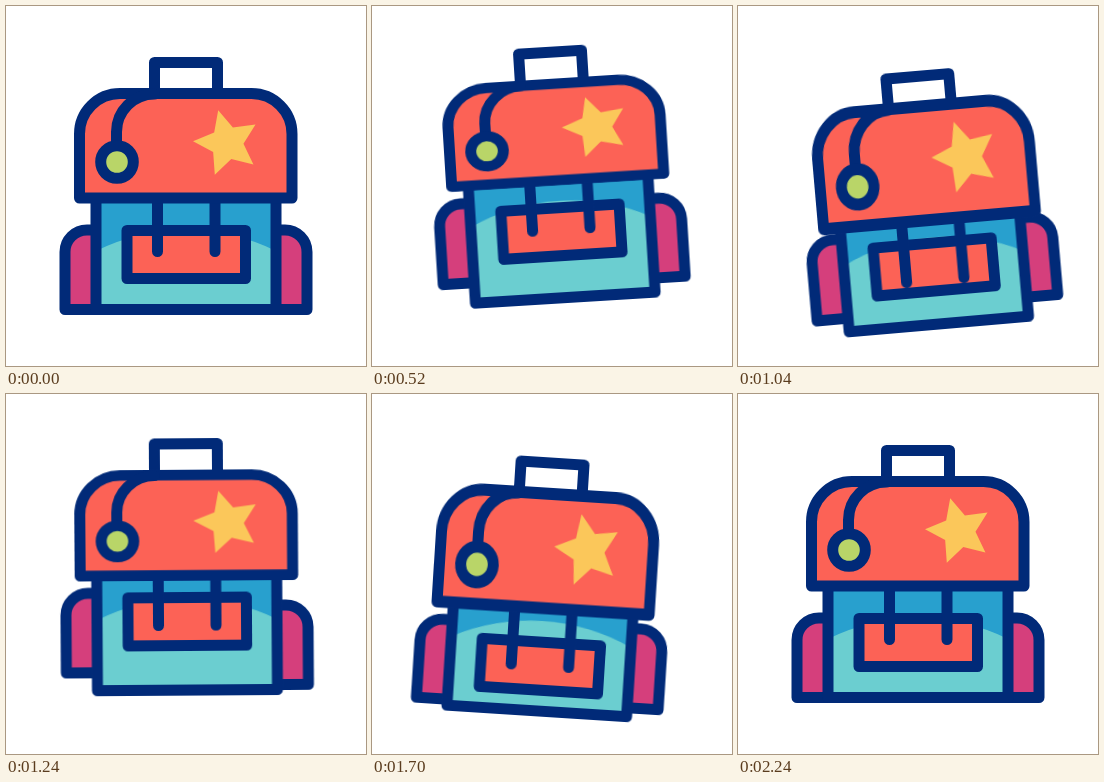
An HTML page for the animation above (2400 ms loop, 360 by 360 pixels).

```html
<!DOCTYPE html>
<html lang="en">
<head>
<meta charset="utf-8">
<title>Bouncing backpack</title>
<style>
  html, body { margin: 0; width: 100%; height: 100%; overflow: hidden; background: #fff; }
  svg { display: block; width: 100vw; height: 100vh; }

  .line { fill: none; stroke: #012a78; stroke-width: 11; stroke-linecap: round; stroke-linejoin: round; }
  .red { fill: #fc6256; }
  .pink { fill: #d53f7c; }
  .teal { fill: #6bced0; }
  .blue { fill: #28a0ce; }
  .gold { fill: #fbc75a; }
  .green { fill: #b9d568; }

  .move { animation: 2400ms cubic-bezier(.37, 0, .63, 1) infinite; }
  .bob { --k: 1; animation-name: bob; }
  #handle { --k: .9; }
  #straps { --k: 1.9; }
  #bag { animation-name: tilt; transform-origin: 180px 78px; }
  #lid { animation-name: lid; transform-origin: 180px 82px; }
  #shade { animation-name: shade; }
  #pocket { animation-name: pocket; }
  #left { animation-name: left; }
  #right { animation-name: right; }

  @keyframes tilt {
    0%, 8.75%, 92%, 100% { transform: rotate(0deg); }
    34.6% { transform: rotate(-7.1deg); }
    65% { transform: rotate(4.1deg); }
  }
  @keyframes bob {
    0%, 8.75%, 92%, 100% { transform: translateY(0); }
    27.9% { transform: translateY(calc(var(--k) * -15px)); }
    42.1% { transform: translateY(calc(var(--k) * 16px)); }
    56.25% { transform: translateY(calc(var(--k) * -14.5px)); }
    71.25% { transform: translateY(calc(var(--k) * 14px)); }
  }
  /* The lid squashes on the way up and stretches on the way down. */
  @keyframes lid {
    0%, 8.75%, 92%, 100% { transform: translateY(0) scaleY(1); }
    27.9% { transform: translateY(-12px) scaleY(.9); }
    42.1% { transform: translateY(13px) scaleY(1.095); }
    56.25% { transform: translateY(-12px) scaleY(.92); }
    71.25% { transform: translateY(12px) scaleY(1.095); }
  }
  @keyframes shade {
    0%, 8.75%, 92%, 100% { transform: translateY(0); }
    25% { transform: translateY(-32px); }
    40% { transform: translateY(12px); }
    55.8% { transform: translateY(-25px); }
    75.8% { transform: translateY(8px); }
  }
  @keyframes pocket {
    0%, 8.75%, 92%, 100% { transform: translateY(0); }
    24.6% { transform: translateY(-24.5px); }
    38.75% { transform: translateY(23px); }
    53.75% { transform: translateY(-23px); }
    70.8% { transform: translateY(24px); }
  }
  @keyframes left {
    0%, 8.75%, 92%, 100% { transform: translateY(0); }
    25.8% { transform: translateY(-37px); }
    41.7% { transform: translateY(3px); }
    55.4% { transform: translateY(-31px); }
    74.2% { transform: translateY(11px); }
  }
  @keyframes right {
    0%, 8.75%, 92%, 100% { transform: translateY(0); }
    29.2% { transform: translateY(-36px); }
    46.5% { transform: translateY(-1px); }
    60% { transform: translateY(-36px); }
    74.2% { transform: translateY(11px); }
  }
</style>
</head>
<body>
<svg viewBox="0 0 360 360">
  <g id="bag" class="move">
    <path id="left" class="move line pink" d="M100 303.5H59V246A22 22 0 0 1 81 224H100Z"/>
    <path id="right" class="move line pink" d="M260 303.5H301V246A22 22 0 0 0 279 224H260Z"/>

    <path class="move bob teal" d="M90 150H270V303.5H90Z"/>
    <path id="shade" class="move blue" d="M90 130H270V245A203 203 0 0 0 90 245Z"/>
    <path class="move bob line" d="M90 150H270V303.5H90Z"/>

    <path id="pocket" class="move line red" d="M121 224.5H239.5V272.5H121Z"/>
    <path id="straps" class="move bob line" d="M151.5 165V245.5M209 165V245.5"/>
    <path id="handle" class="move bob line" d="M148.5 92V56.5H211.5V92"/>

    <g id="lid" class="move">
      <path class="line red" d="M73.5 192V128A40.5 40.5 0 0 1 114 87.5H245.5A40.5 40.5 0 0 1 286 128V192Z"/>
      <path id="star" class="gold"/>
      <path class="line" d="M110.5 140V126A38 38 0 0 1 148.5 88"/>
      <circle class="line green" cx="111" cy="156" r="16.3"/>
    </g>
  </g>
</svg>
<script>
  const tips = Array.from({ length: 10 }, (_, i) => {
    const angle = (-105 + i * 36) * Math.PI / 180;
    const radius = i % 2 ? 16.5 : 34;
    return [221 + radius * Math.cos(angle), 137 + radius * Math.sin(angle)];
  });
  document.getElementById('star').setAttribute('d', 'M' + tips.join('L') + 'Z');
</script>
</body>
</html>
```
